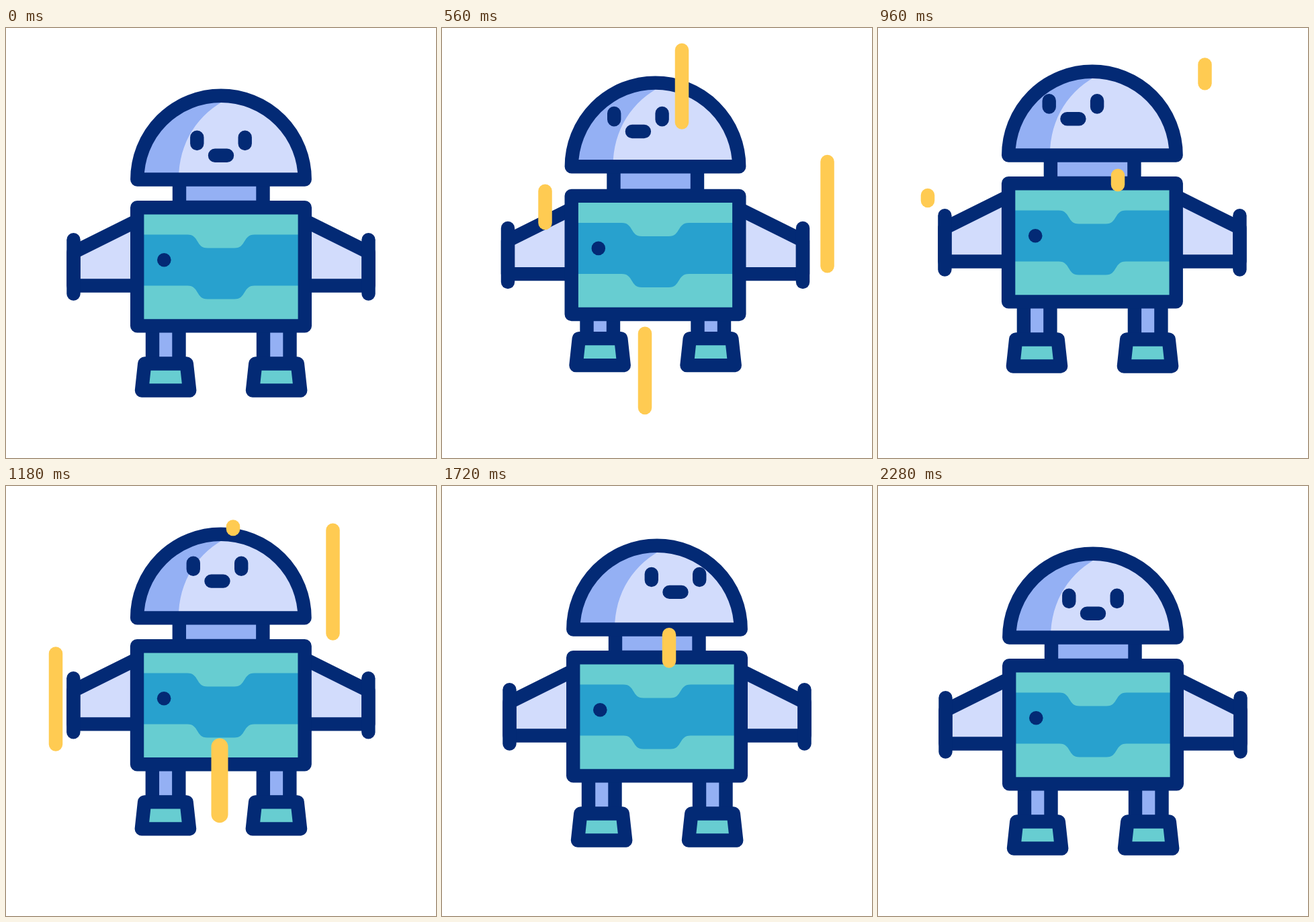
An HTML page for the animation above (2400 ms loop, 640 by 640 pixels).

```html
<!DOCTYPE html>
<html lang="en">
<head>
<meta charset="utf-8">
<title>Jumping robot</title>
<style>
  html, body { margin: 0; width: 100%; height: 100%; overflow: hidden; background: #fff; }
  svg { display: block; width: 100vw; height: 100vh; }
  .ink { stroke: #032a75; stroke-width: 20.4; stroke-linecap: round; stroke-linejoin: round; }
  .pale { fill: #d2dcfc; }
  .mid { fill: #94b0f4; }
  .teal { fill: #67cdd1; }
  .blue { fill: #28a1ce; }
  .none { fill: none; }
  #streaks { stroke: #ffcb52; stroke-linecap: round; }
</style>
</head>
<body>
<svg viewBox="0 0 640 640">
  <defs>
    <g id="leg">
      <path class="ink mid" d="M218 445V500H257.5V445"/>
      <path class="ink teal" d="M206.3 499.5H268.8L273.2 539.5H202Z"/>
    </g>
    <g id="arm">
      <path class="ink pale" d="M195 286.8L100.5 333.8V383.5H195"/>
      <path class="ink" d="M100.5 315.3V395.5"/>
    </g>
    <path id="dome" d="M195.3 225.5A124.7 124.7 0 0 1 444.7 225.5Z"/>
    <path id="box" d="M195.2 267.3H444.8V443.4H195.2Z"/>
  </defs>
  <g id="robot">
    <use href="#leg"/>
    <use href="#leg" x="165"/>
    <g id="body">
      <path class="ink mid" d="M258 228V267H382.5V228"/>
      <use href="#arm"/>
      <use href="#arm" transform="matrix(-1 0 0 1 640 0)"/>
      <use href="#box" class="teal"/>
      <path class="blue" d="M200 307.5H270C288 307.5 282 327.5 300 327.5H340C358 327.5 352 307.5 370 307.5H440V383.5H370C352 383.5 358 403.5 340 403.5H300C282 403.5 288 383.5 270 383.5H200Z"/>
      <use href="#box" class="ink none"/>
      <circle cx="235.3" cy="345.3" r="10.3" fill="#032a75"/>
    </g>
    <g id="head">
      <use href="#dome" class="pale"/>
      <path class="mid" d="M195.5 225.5A124.5 124.5 0 0 1 320 101L331 105C286 127 257 170 257 225.5Z"/>
      <use href="#dome" class="ink none"/>
      <path id="face" class="ink none" d="M284.3 162.8V172M355.7 162.8V172M311 189.8H329"/>
    </g>
  </g>
  <g id="streaks"></g>
</svg>
<script>
  const LOOP = 2400, RUN = 440, LAG = 260, LENGTH = 200;
  const $ = id => document.getElementById(id);
  const robot = $("robot"), body = $("body"), head = $("head"), face = $("face");
  const streaks = [];

  function addStreak(x, top, start, width = 20.5) {
    const line = document.createElementNS("http://www.w3.org/2000/svg", "line");
    line.setAttribute("x1", x);
    line.setAttribute("x2", x);
    line.setAttribute("stroke-width", width);
    $("streaks").append(line);
    streaks.push({ line, top, start });
  }
  addStreak(153.5, 90, 0);
  addStreak(302, 365, 96);
  addStreak(573.5, 185, 230);
  addStreak(357, 33, 330);
  addStreak(486.5, 54.5, 858);
  addStreak(74, 249, 908);
  addStreak(318, 388, 960, 25);
  addStreak(338, 60.5, 1146);

  // Progress from 0 to 1 between two times.
  const linear = (t, from, to) => Math.min(1, Math.max(0, (t - from) / (to - from)));
  const smooth = u => u * u * (3 - 2 * u);
  const ease = (t, from, to) => smooth(linear(t, from, to));
  const settle = (t, from, to) => smooth(1 - (1 - linear(t, from, to)) ** 2);

  const move = (el, x, y) => el.setAttribute("transform", `translate(${x.toFixed(3)} ${y.toFixed(3)})`);

  function draw(now) {
    const t = now % LOOP;

    const lift = ease(t, 220, 590) - linear(t, 900, 2100);
    const sway = ease(t, 220, 560) - ease(t, 560, 1300);
    const crouch = ease(t, 0, 260) - ease(t, 450, 900);
    move(robot, -2.5 * sway, -38 * lift);
    move(body, 0, 23.5 * crouch);
    move(head, 0, 21.4 * crouch);

    // The face looks left, then right, then ahead again.
    const left = ease(t, 160, 660), right = ease(t, 960, 1460), back = 1 - settle(t, 1740, 2280);
    move(face, (56 * right - 28.5 * left) * back, (-18.5 * left - 1.4 * right) * back);

    for (const { line, top, start } of streaks) {
      const tip = ease(t, start, start + RUN), tail = ease(t, start + LAG, start + LAG + RUN);
      line.setAttribute("y1", top + LENGTH * tail);
      line.setAttribute("y2", top + LENGTH * tip);
      line.style.display = tip - tail > 0.0005 ? "" : "none";
    }
  }

  const origin = performance.now();
  function tick() {
    draw(performance.now() - origin);
    requestAnimationFrame(tick);
  }
  tick();
</script>
</body>
</html>
```
